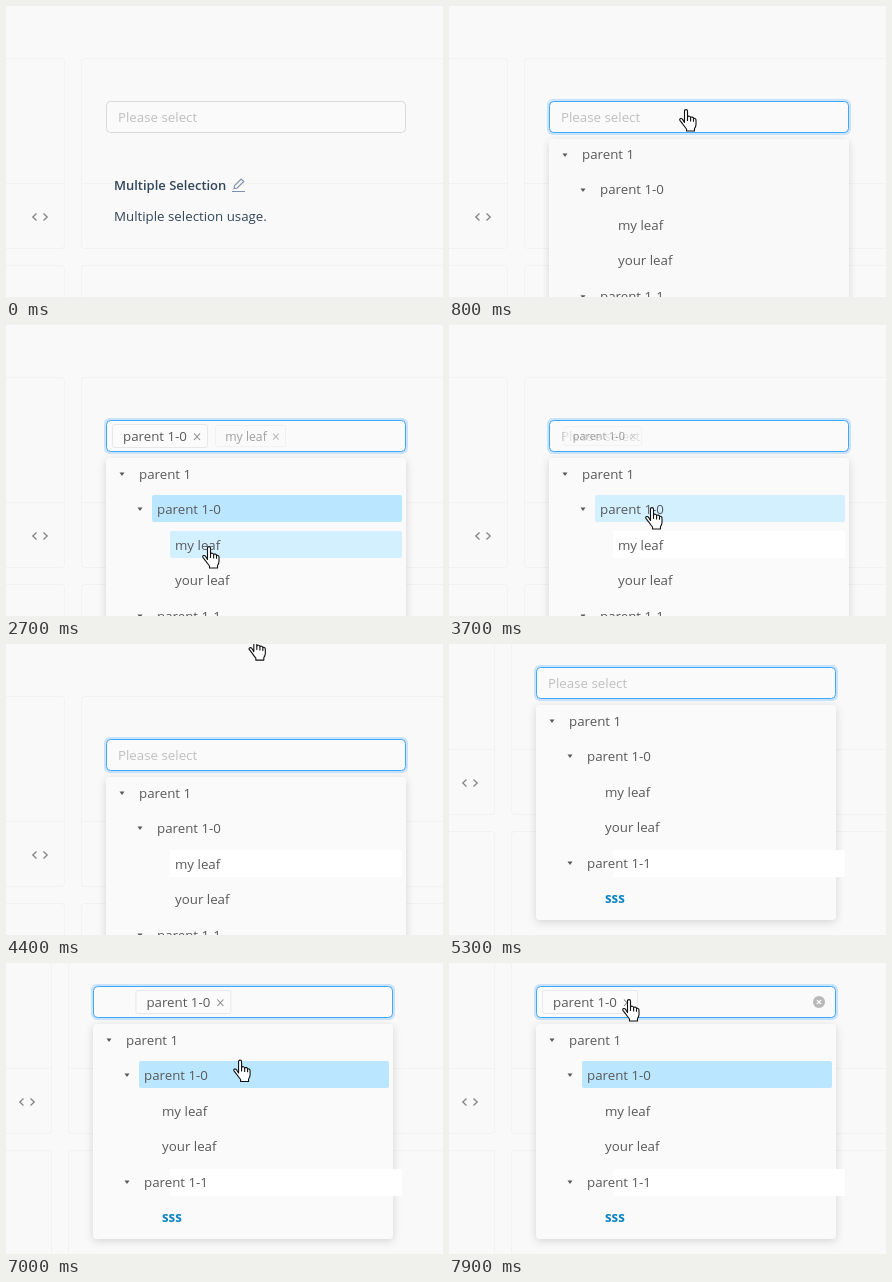
An HTML page that plays this animation: 437 by 291 pixels, repeating every 8000 ms.

```html
<!DOCTYPE html>
<html lang="en">
<head>
<meta charset="utf-8">
<title>Tree select</title>
<style>
html, body { margin: 0; width: 100%; height: 100%; overflow: hidden; background: #f9f9f9; }
svg { display: block; width: 437px; height: 291px; font: 13.3px "Open Sans", "Noto Sans", sans-serif; }
text { fill: #595959; white-space: pre; }
.card { fill: none; stroke: #f2f2f2; }
.doc { fill: #314659; }
.title { font-size: 13px; font-weight: 600; }
.hint { fill: #bfbfbf; }
.off { fill: #0d85c4; font-weight: 700; }
.icon { fill: none; stroke: #858585; stroke-width: 1.3; }
.tag rect { fill: #fbfbfb; stroke: #e8e8e8; }
.tag path { fill: none; stroke: #858585; stroke-width: 1.1; }
#panel { filter: drop-shadow(0 2px 4px rgba(0, 0, 0, .15)); }
</style>
</head>
<body>
<svg viewBox="0 0 437 291">
  <g class="scroll">
    <g class="card">
      <rect x="-60.5" y="52.5" width="119" height="190" rx="3"/>
      <rect x="75.5" y="52.5" width="440" height="190" rx="3"/>
      <rect x="-60.5" y="259.5" width="119" height="190" rx="3"/>
      <rect x="75.5" y="259.5" width="440" height="190" rx="3"/>
      <path d="M-60 177.5H58M76 177.5H515"/>
    </g>
    <path class="icon" d="M30.5 207.5L26.8 211L30.5 214.5M37.5 207.5L41.2 211L37.5 214.5"/>
    <text class="doc title" x="108" y="184">Multiple Selection</text>
    <path class="icon" style="stroke:#7d93ad;stroke-width:1.1" d="M226 185.5H239M228 182.5L228.6 179.6L235.2 173L237.8 175.5L231.2 182Z"/>
    <text class="doc" x="108" y="215">Multiple selection usage.</text>
    <rect id="glow" x="99" y="94" width="302" height="34" rx="5" fill="none" stroke="#1890ff" stroke-opacity=".22" stroke-width="2"/>
    <rect x="100.5" y="95.5" width="299" height="31" rx="4" fill="#fafafa" stroke="#d9d9d9"/>
    <rect id="focus" x="100.5" y="95.5" width="299" height="31" rx="4" fill="none" stroke="#40a9ff"/>
    <text id="hint" class="hint" x="112" y="116">Please select</text>
    <g id="tags"></g>
    <g id="clear">
      <circle cx="383" cy="111" r="6" fill="#b8b8b8"/>
      <path d="M380.8 108.8l4.4 4.4m0-4.4l-4.4 4.4" stroke="#fff" stroke-width="1.2"/>
    </g>
  </g>
  <g class="scroll"><rect id="panel" x="100" y="133" width="300" height="215" rx="4" fill="#fafafa"/></g>
  <rect id="trail" x="164" y="206" width="232" height="27" fill="#fff"/>
  <g class="scroll"><g id="rows"></g></g>
  <g id="hand" stroke="#111" stroke-width="1.1" stroke-linejoin="round">
    <path fill="#fff" d="M5.5 13.5V2.2Q5.5 .6 7 .6T8.5 2.2V8Q9 6.9 10.3 7.2T11.6 8.6Q12.2 7.8 13.4 8.1T14.5 9.6Q15 9 16 9.4T17 11V15.5Q17 17.5 15.5 19.5V22H7.5V20Q5 17 3.6 14.8L.9 11.3Q.3 10 1.5 9.6T3.6 10.4Z"/>
    <path fill="none" d="M8.5 8V12M11.6 8.6V12.5M14.5 9.6V12.8"/>
  </g>
</svg>
<script>
const LOOP = 8000, OPEN = 600;
const NONE = 'none', HOVER = '#d2f0ff', SELECTED = '#bae7ff';
const $ = id => document.getElementById(id);
const clamp = v => Math.max(0, Math.min(1, v));
const span = (t, start, length) => clamp((t - start) / length);
const easeOut = p => 1 - (1 - p) ** 2;
const easeInOut = p => p * p * (3 - 2 * p);
const mix = (a, b, p) => a + (b - a) * p;

function add(parent, name, attrs, content = '') {
  const node = document.createElementNS('http://www.w3.org/2000/svg', name);
  for (const key in attrs) node.setAttribute(key, attrs[key]);
  node.textContent = content;
  return parent.appendChild(node);
}

// label, depth, text centre, background changes as [time, fill]
const rows = [
  ['parent 1', 0, 149, [[3850, HOVER], [4000, NONE]]],
  ['parent 1-0', 1, 184, [[1780, HOVER], [2100, SELECTED], [3600, HOVER], [3820, NONE], [6200, HOVER], [6330, SELECTED]]],
  ['my leaf', 2, 220, [[2450, HOVER], [2760, SELECTED], [3200, HOVER], [3350, NONE], [6560, HOVER], [6680, NONE]]],
  ['your leaf', 2, 255, [[5850, HOVER], [6000, SELECTED], [6760, HOVER], [6860, NONE]]],
  ['parent 1-1', 1, 291, []],
  ['sss', 2, 326, []]
].map(([label, depth, y, changes]) => {
  const x = 133 + 18 * depth, parent = $('rows');
  const back = add(parent, 'rect', { x: x - 5, y: y - 14, width: 401 - x - 0, height: 27, rx: 2, fill: NONE });
  back.setAttribute('width', 396 - (x - 5));
  if (depth < 2) add(parent, 'path', { d: `M${x - 19.5} ${y - 1.5}h5l-2.5 3.5z`, fill: '#595959' });
  add(parent, 'text', { x, y: y + 4.5, class: label === 'sss' ? 'off' : '' }, label);
  return { back, changes };
});

const tags = [
  { label: 'parent 1-0', x: 106, w: 96, from: 2100, to: 3600 },
  { label: 'my leaf', x: 206, w: 77, from: 2590, to: 3200 },
  { label: 'your leaf', x: 106, w: 85, from: 6000, to: 6750 },
  { label: 'parent 1-0', x: 195, w: 96, from: 6350, to: LOOP + 1, slide: 6900 }
];
for (const tag of tags) {
  const g = tag.node = add($('tags'), 'g', { class: 'tag' });
  const half = tag.w / 2;
  add(g, 'rect', { x: .5 - half, y: -11.5, width: tag.w - 1, height: 23, rx: 2 });
  add(g, 'text', { x: 11 - half, y: 5 }, tag.label);
  add(g, 'path', { d: `M${half - 14} -2.5l6 6.5m0-6.5l-6 6.5` });
}

// time, left, top
const path = [
  [100, 252, 88], [400, 230, 103], [1000, 230, 103], [1300, 232, 106], [1500, 228, 112],
  [1700, 186, 172], [1900, 190, 180], [2350, 194, 183], [2500, 196, 221], [3250, 196, 221],
  [3400, 196, 182], [3700, 196, 182], [4100, 222, 105], [4500, 246, -26],
  [5600, 214, 236], [5850, 196, 184], [6020, 194, 182], [6250, 188, 113], [6350, 187, 115],
  [6500, 187, 154], [6700, 188, 182], [6800, 188, 182], [7150, 252, 42], [7300, 255, 37],
  [7400, 250, 37], [7850, 173, 36], [8000, 173, 36]
];

function handAt(t) {
  if (t < path[0][0] || (t > 4500 && t < 5600)) return [-50, -50];
  const i = Math.min(path.findLastIndex(k => k[0] <= t), path.length - 2);
  const [a, b] = [path[i], path[i + 1]];
  const p = easeInOut(span(t, a[0], b[0] - a[0]));
  return [mix(a[1], b[1], p), mix(a[2], b[2], p)];
}

function render(t) {
  const move = easeInOut(span(t, 4700, 500));
  const shift = `translate(${Math.round(-13 * move)} ${Math.round(-72 * move)})`;
  for (const g of document.querySelectorAll('.scroll')) g.setAttribute('transform', shift);

  const open = easeOut(span(t, OPEN, 220));
  $('glow').style.opacity = $('focus').style.opacity = span(t, OPEN - 100, 200);
  for (const id of ['panel', 'rows']) {
    $(id).style.opacity = open;
    $(id).setAttribute('transform', `translate(0 ${133 * .2 * (1 - open)}) scale(1 ${.8 + .2 * open})`);
  }
  for (const { back, changes } of rows) {
    const now = changes.findLast(c => c[0] <= t);
    back.setAttribute('fill', now ? now[1] : NONE);
  }
  for (const { node, x, w, from, to, slide } of tags) {
    const grow = span(t, from, 200), fade = span(t, to, 220);
    const scale = t < to ? .6 + .4 * easeOut(grow) : 1 - .4 * fade;
    const left = slide ? mix(x, 106, easeInOut(span(t, slide, 180))) : x;
    node.style.opacity = grow * (1 - fade);
    node.setAttribute('transform', `translate(${left + w / 2} 111) scale(${scale})`);
  }
  const empty = t < 2100 || (t >= 3600 && t < 6000);
  $('hint').style.opacity = empty ? 1 : 0;
  $('clear').style.opacity = span(t, 7050, 150);
  $('trail').style.opacity = t >= 3350 ? 1 : 0;
  const [x, y] = handAt(t);
  $('hand').setAttribute('transform', `translate(${x} ${y})`);
}

const start = performance.now();
function tick(now) {
  render(Math.max(0, now - start) % LOOP);
  requestAnimationFrame(tick);
}
render(0);
requestAnimationFrame(tick);
</script>
</body>
</html>
```
